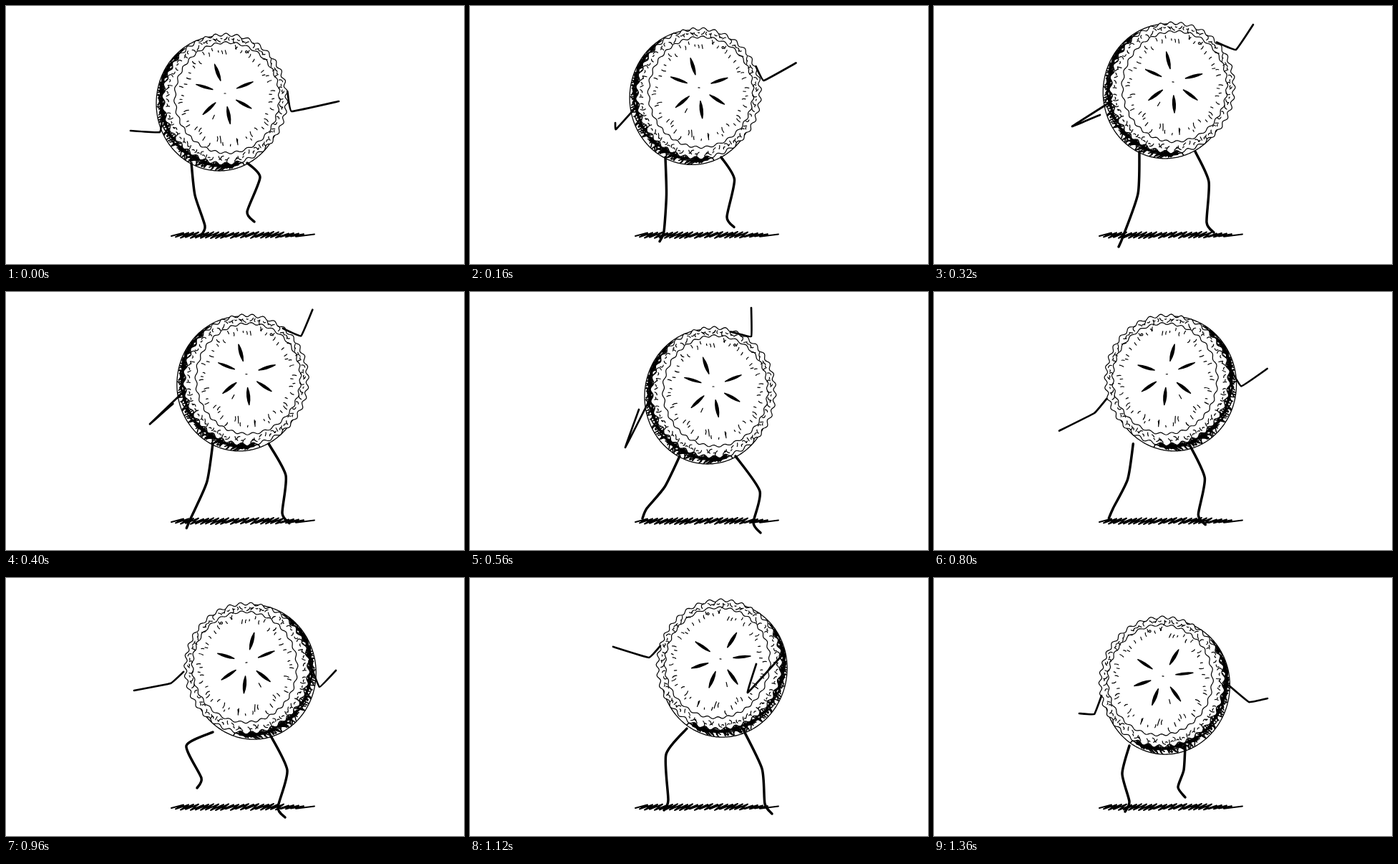
Animation of 640x360 px, one loop 1440 ms. Source, as an HTML page with a canvas:

```html
<!DOCTYPE html>
<html lang="en">
<head>
<meta charset="utf-8">
<title>Dancing pie</title>
<style>
html, body { margin: 0; width: 100%; height: 100%; overflow: hidden; background: #fff; }
canvas { display: block; }
</style>
</head>
<body>
<canvas id="stage" width="640" height="360"></canvas>
<script>
const ctx = document.getElementById('stage').getContext('2d');
const TAU = Math.PI * 2, DEG = TAU / 360, STEP = 80, STEPS = 18, TURN = 10;

// The dance: key steps, the pie's place and tilt, and each limb's two main joints.
// Shoulders, hips and toes follow from these.
const keySteps = [0, 4, 7, 9, 12, 14, 17];
const body = [[306, 122, 0], [334, 106, 7], [340, 132, 0], [320, 113, 5],
  [336, 118, 5], [350, 113, -12], [320, 137, -11]];
const arms = [
  [[215, 176, 174, 174], [193, 168, 232, 152], [217, 217, 236, 164], [221, 180, 173, 212],
    [230, 147, 179, 157], [250, 111, 200, 96], [224, 190, 203, 189]],
  [[399, 147, 465, 133], [422, 61, 446, 26], [393, 62, 393, 22], [425, 121, 468, 96],
    [438, 152, 461, 129], [388, 160, 400, 120], [440, 173, 466, 168]]
];
const legs = [
  [[264, 264, 278, 307], [285, 262, 264, 322], [272, 272, 247, 302], [280, 275, 239, 313],
    [252, 234, 273, 279], [274, 246, 277, 310], [263, 273, 273, 312]],
  [[355, 239, 337, 287], [384, 245, 381, 302], [405, 278, 396, 322], [371, 255, 364, 306],
    [393, 268, 380, 320], [408, 266, 412, 315], [349, 268, 341, 292]]
];

let seed = 7;
const rand = (lo = 0, hi = 1) => {
  seed = (seed * 16807) % 2147483647;
  return lo + (hi - lo) * seed / 2147483647;
};

function pose(keys, step) {
  const next = Math.max(1, keySteps.findIndex(k => k >= step)), from = keySteps[next - 1];
  const u = (step - from) / (keySteps[next] - from);
  return keys[next - 1].map((v, i) => v + (keys[next][i] - v) * u);
}

// Point on one of the pie's rings, pushed out by some pixels
const ring = (cx, cy, rx, ry) => (a, out = 0) =>
  [cx + (rx + out) * Math.cos(a), cy + (ry + out) * Math.sin(a)];
const plate = ring(-8, 14, 88, 94);
const rim = ring(0, 8, 86, 90);
const lid = ring(3, 6, 73, 77);

function loop(at, lobes = 0, size = 0) {
  const path = new Path2D();
  for (let a = 0; a < TAU; a += .02)
    path.lineTo(...at(a, size * Math.sin(a * lobes + Math.sin(a * 3))));
  path.closePath();
  return path;
}

function curl(path, [x, y], angle, length, bend) {
  const dx = Math.cos(angle) * length / 2, dy = Math.sin(angle) * length / 2;
  path.moveTo(x - dx, y - dy);
  path.quadraticCurveTo(x - dy * bend, y + dx * bend, x + dx, y + dy);
}

const platePath = loop(plate), rimPath = loop(rim, 36, 2), lidPath = loop(lid, 31, 1.4);

// Scribbles on the shaded side of the tin
const shade = new Path2D();
for (let a = 1.3; a < 3.9; a += .03) {
  shade.moveTo(...rim(a, -1));
  shade.lineTo(...plate(a + rand(-.14, .1), rand(-4, 0)));
  shade.moveTo(...rim(a, rand(1, 5)));
  shade.lineTo(...rim(a + .17, rand(1, 8)));
}

const crumbs = new Path2D();
for (let a = 0; a < TAU; a += .1) {
  curl(crumbs, rim(a + rand(-.03, .03), rand(-9, -4)), a + rand(-1, 1), rand(4, 7), rand(-1.5, 1.5));
  if (rand() < .6) curl(crumbs, rim(a + .05, -5), a + rand(1, 2), rand(2, 4), 1);
}
for (let a = 0; a < TAU; a += .115) {
  const low = Math.max(0, Math.sin(a));
  curl(crumbs, lid(a + rand(-.06, .06), rand(-14, -5) - rand(0, 9) * low),
    a + rand(-.3, .3), rand(2, 6) + low * rand(0, 5), rand(-.6, .6));
}
curl(crumbs, [-16, 33], 2, 6, 0);
curl(crumbs, [0, 0], 0, 2, 0);
crumbs.addPath(loop(ring(30, -58, 1.4, 1.4)));

// Steam vents: leaf shapes pointing away from the middle
const vents = new Path2D();
for (const angle of [-110, -22, 29, 80, 137, 197]) {
  const a = angle * DEG, upright = Math.abs(Math.sin(a));
  for (const bend of [-.28, -.05, .08, .28])
    curl(vents, ring(0, 0, 30, 31)(a), a, 24, bend * (.7 + .4 * upright));
}

function outline(path) {
  ctx.fillStyle = '#fff';
  ctx.fill(path);
  ctx.stroke(path);
}

function drawPie(x, y, tilt, flipped) {
  ctx.save();
  ctx.translate(x, y);
  if (flipped) ctx.scale(-1, 1);
  ctx.rotate(tilt * DEG);
  ctx.lineWidth = 1.3;
  outline(platePath);
  ctx.save();
  ctx.clip(platePath);
  ctx.lineWidth = 1.6;
  ctx.stroke(shade);
  ctx.restore();
  ctx.lineWidth = 1.2;
  outline(rimPath);
  outline(lidPath);
  ctx.stroke(crumbs);
  ctx.lineWidth = 1.5;
  ctx.stroke(vents);
  ctx.restore();
}

// Smooth line through the joints; round 0 keeps the corners sharp
function drawLimb(p, width, round) {
  const last = p.length - 1;
  const slope = (i, axis) =>
    (p[Math.min(i + 1, last)][axis] - p[Math.max(i - 1, 0)][axis]) * round / 6;
  ctx.lineWidth = width;
  ctx.beginPath();
  ctx.moveTo(...p[0]);
  for (let i = 0; i < last; i++) {
    const [x, y] = p[i], [nx, ny] = p[i + 1];
    ctx.bezierCurveTo(x + slope(i, 0), y + slope(i, 1),
      nx - slope(i + 1, 0), ny - slope(i + 1, 1), nx, ny);
  }
  ctx.stroke();
}

// Shoulders slide along the rim, a little above the line to the hand
function drawArm([ex, ey, hx, hy], x, y, side) {
  const a = Math.atan2(hy - y - 8, hx - x) - side * 8 * DEG;
  drawLimb([ring(x, y + 8, 88, 88)(a), [ex, ey], [hx, hy]], 2.7, .25);
}

function drawLeg([kx, ky, ax, ay], x, y, side) {
  const hip = [x - 8 + side * 39, y + 97];
  drawLimb([hip, [kx, ky], [ax, ay], [ax + 2 + side * 8, ay + 14]], 3.5, .7);
}

const ground = new Path2D();
ground.moveTo(231, 321);
for (let x = 231; x < 405; x += 7) {
  const h = x < 375 ? 3.2 : 1.5;
  ground.lineTo(x + 17, 319 - h + rand(-.8, .8));
  ground.lineTo(x + 6, 320 + h + rand(-1, 1));
}
ground.lineTo(431, 318.5);

function draw(now) {
  const step = Math.floor(now / STEP) % STEPS;
  const [x, y, tilt] = pose(body, step);
  ctx.fillStyle = '#fff';
  ctx.fillRect(0, 0, 640, 360);
  ctx.strokeStyle = '#000';
  ctx.lineCap = ctx.lineJoin = 'round';
  ctx.lineWidth = 2;
  ctx.stroke(ground);
  drawPie(x, y, tilt, step >= TURN);
  [-1, 1].forEach((side, i) => {
    drawArm(pose(arms[i], step), x, y, side);
    drawLeg(pose(legs[i], step), x, y, side);
  });
  requestAnimationFrame(draw);
}
requestAnimationFrame(draw);
</script>
</body>
</html>
```
